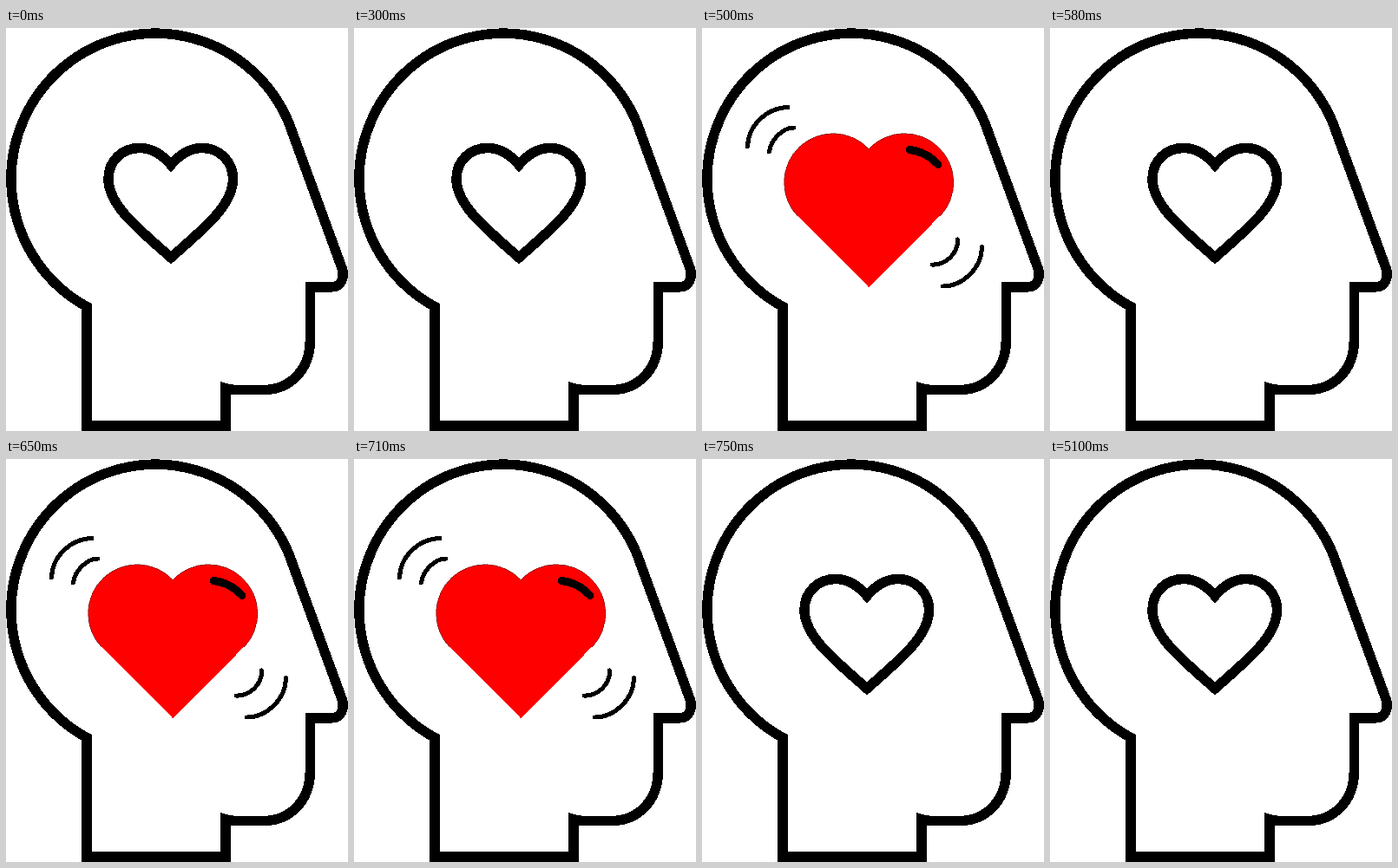
Write an HTML page that moves like this. It is 394 by 465 pixels and loops after 8 s.

```html
<!DOCTYPE html>
<html lang="en">
<head>
<meta charset="utf-8">
<title>Beating heart in a head</title>
<style>
  html, body { margin: 0; width: 100%; height: 100%; overflow: hidden; background: #fff; }
  svg { display: block; width: 100vw; height: 100vh; shape-rendering: crispEdges; }
  .line { fill: none; stroke: #000; stroke-width: 11.5; stroke-miterlimit: 8; }
  .shake { fill: none; stroke: #000; stroke-width: 5; stroke-linecap: round; }
  .shine { fill: none; stroke: #000; stroke-width: 9; stroke-linecap: round; }
  .lobes { fill: #f00; stroke: #400; stroke-width: .5; }
  #beat { opacity: 0; }
</style>
</head>
<body>
<svg viewBox="0 0 394 465">
  <path class="line" d="M93 321.5 A166.3 167.8 0 1 1 330.5 122.3
    L387 277 C390.500 288 386 298.800 376 298.800 H350.300 V361
    C350.300 394 327 417.500 297 417.500 H266 Q259 417.500 253 415.700 V459.200 H93 Z"/>

  <path id="rest" class="line" d="M190 158 C180 146 168 138.500 154 138.500
    C133 138.500 118 154 118 174 C118 205 152 231 190 265
    C228 231 261.500 205 261.500 174 C261.500 154 246 138.500 226 138.500
    C212 138.500 200 146 190 158 Z"/>

  <g id="beat">
    <path class="lobes" d="M110 217 A56.5 56.5 0 1 1 192.200 139.400
      A56.5 56.5 0 1 1 274.400 217"/>
    <path fill="#f00" d="M110 216.500 H274.400 L192.500 299.500 Z"/>
    <path class="shine" d="M239 140.500 Q258 142.500 272 157.500"/>
    <path class="shake" d="M99 91.500 C75 92 53 112 52.500 137"/>
    <path class="shake" d="M106 115 C93 115 79 129 77.500 143"/>
    <path class="shake" d="M265 273 C280 274 295 261 294.500 244"/>
    <path class="shake" d="M277.500 298 C300 298 322 278 322.500 252.500"/>
  </g>
</svg>
<script>
  const LOOP = 8000;
  // [time in ms, heart is beating]
  const steps = [[0, 0], [500, 1], [580, 0], [650, 1], [750, 0], [LOOP, 0]];

  function toggle(id, shownWhen) {
    const frames = steps.map(([time, beating]) => ({
      offset: time / LOOP,
      opacity: beating === shownWhen ? 1 : 0,
      easing: 'step-end'
    }));
    document.getElementById(id).animate(frames, { duration: LOOP, iterations: Infinity });
  }

  toggle('rest', 0);
  toggle('beat', 1);
</script>
</body>
</html>
```
